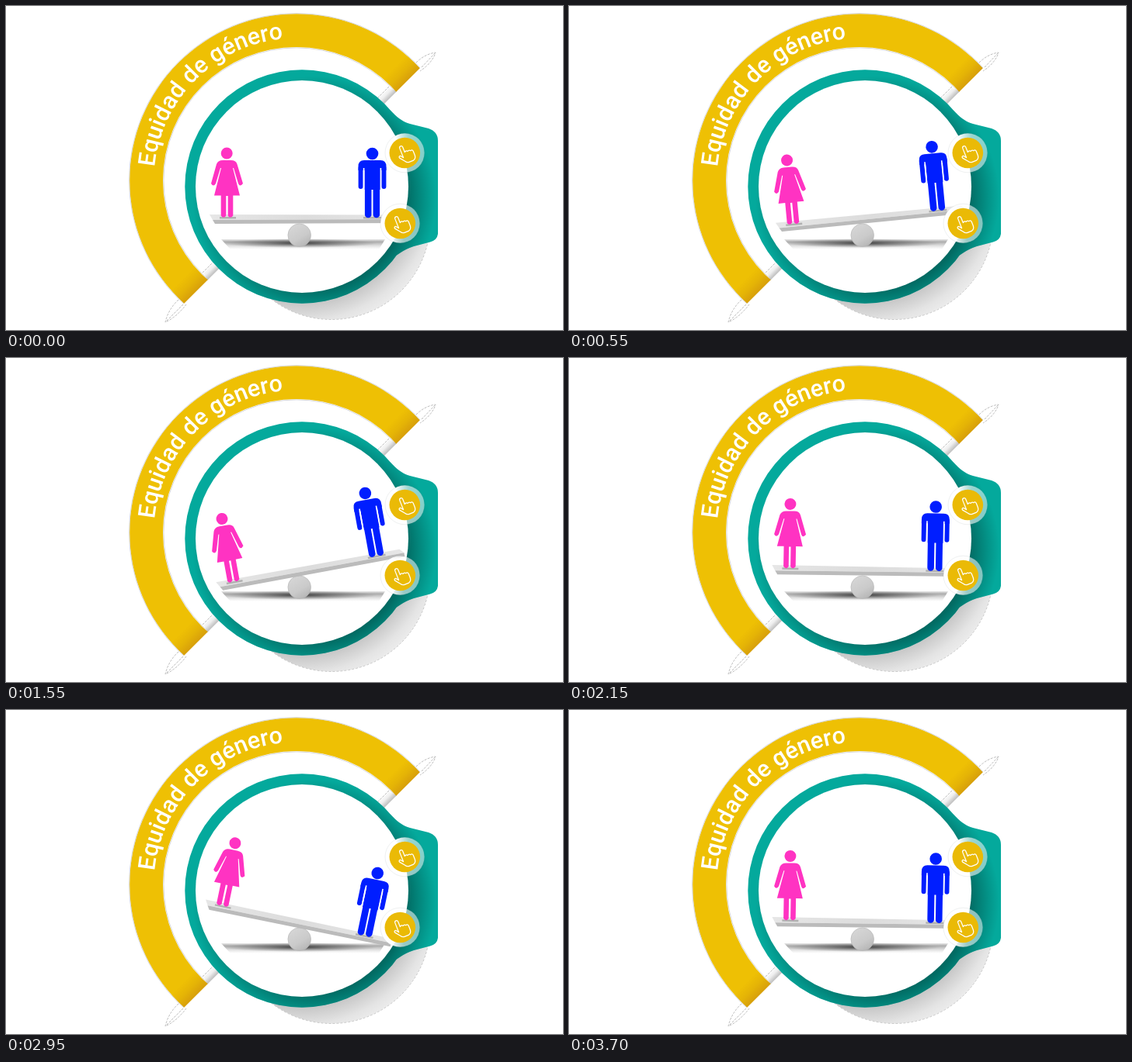
Recreate the animation shown at these times as an HTML page with a canvas. Size 717 by 418 pixels, loop 3.75 s.

```html
<!DOCTYPE html>
<html lang="es">
<head>
<meta charset="utf-8">
<title>Equidad de género</title>
<style>
  html, body { margin: 0; width: 100%; height: 100%; overflow: hidden; background: #fff; }
  canvas { display: block; }
</style>
</head>
<body>
<canvas id="stage" width="717" height="418"></canvas>
<script>
const ctx = document.getElementById('stage').getContext('2d');
const TAU = Math.PI * 2;
const LOOP = 3750, STEP = 50;
const YELLOW = '#eec004', TEAL = '#04a99c', PINK = '#ff33c2', BLUE = '#001eff';
const BAND = { x: 374, y: 225, inner: 172, outer: 214.8 };
const HUB = { x: 381, y: 233 };
const PIVOT = { x: 378, y: 233 };
// [time in ms, tilt in degrees]
const TILT = [[0, 0], [1375, -13.6], [2825, 13.6], [LOOP, 0.2]];

function tiltAt(t) {
  const i = TILT.findIndex(key => key[0] > t);
  const [t0, a] = TILT[i - 1], [t1, b] = TILT[i];
  return a + (b - a) * (t - t0) / (t1 - t0);
}

function fill(path, style) {
  ctx.fillStyle = style;
  ctx.fill(path);
}

function outline(path, style, width, dash = []) {
  ctx.setLineDash(dash);
  ctx.strokeStyle = style;
  ctx.lineWidth = width;
  ctx.stroke(path);
  ctx.setLineDash([]);
}

function circle(x, y, r) {
  const path = new Path2D();
  path.arc(x, y, r, 0, TAU);
  return path;
}

function ramp(gradient, ...stops) {
  stops.forEach(([at, color]) => gradient.addColorStop(at, color));
  return gradient;
}

const linear = (x0, y0, x1, y1, ...stops) =>
  ramp(ctx.createLinearGradient(x0, y0, x1, y1), ...stops);
const radial = (x, y, r0, r1, ...stops) =>
  ramp(ctx.createRadialGradient(x, y, r0, x, y, r1), ...stops);

function drawFlaps() {
  const strip = new Path2D('M503 110L482 131L466 131L492 105ZM259 354L280 333V317L254 343Z');
  fill(strip, linear(381, 232, 372, 223, [0, '#bdbdbd'], [0.5, '#eeeeee'], [1, '#ffffff']));
  const edges = new Path2D('M528 73Q539 62 553 60Q549 73 533 84M535 79L552 61' +
    'M222 379Q209 391 205 408Q220 401 232 385M228 385L206 407' +
    'M493 104L478 119M253 344L268 329');
  outline(edges, '#aaaaaa', 0.8, [3, 1.5]);
}

function drawBand() {
  ctx.save();
  ctx.clip(new Path2D('M0 0H613L195 418H0Z'));
  const ring = circle(BAND.x, BAND.y, BAND.outer);
  ring.arc(BAND.x, BAND.y, BAND.inner, TAU, 0, true);
  fill(ring, linear(381, 232, 364, 215, [0, '#d79f0b'], [0.5, '#e5b406'], [1, YELLOW]));
  outline(circle(BAND.x, BAND.y, BAND.outer + 0.7), '#bbbbbb', 0.6);
  outline(circle(BAND.x, BAND.y, BAND.inner - 0.9), '#bbbbbb', 0.6);
  ctx.restore();
}

function drawTitle() {
  const text = 'Equidad de género', radius = 183.5, start = 185.4 * Math.PI / 180;
  ctx.font = '500 30.5px Roboto, sans-serif';
  ctx.textAlign = 'center';
  ctx.fillStyle = '#fff';
  [...text].forEach((letter, i) => {
    const before = ctx.measureText(text.slice(0, i)).width;
    const angle = start + (before + ctx.measureText(letter).width / 2) / radius;
    ctx.save();
    ctx.translate(BAND.x, BAND.y);
    ctx.rotate(angle + Math.PI / 2);
    ctx.fillText(letter, 0, -radius);
    ctx.restore();
  });
}

function drawHub() {
  const { x, y } = HUB;
  const cast = circle(419, 277.5, 127);
  fill(cast, radial(x, y, 148, 212, [0, '#c4c4c4'], [0.4, '#e4e4e4'], [1, '#fdfdfd']));
  outline(cast, '#b5b5b5', 0.7, [3, 2]);

  fill(circle(x, y, 158), linear(x, y, x + 14, y + 14, [0, '#ffffff'], [1, 'rgba(255,255,255,0)']));
  drawFlaps();

  const body = circle(x, y, 150.7);
  body.addPath(new Path2D('M470 112C492 126 499 146 520 152L544 158Q556 162 556 174' +
    'V294Q555 302 546 304.5L525 310C498 319 488 338 462 359L420 233Z'));
  fill(body, TEAL);
  fill(body, radial(x + 16, y + 14, 118, 157,
    [0, 'rgba(0,60,56,.58)'], [0.5, 'rgba(0,68,63,.3)'], [1, 'rgba(0,75,70,0)']));
  fill(circle(x, y, 137), '#fff');
}

function drawFulcrum() {
  const ground = new Path2D('M277 301H488L480 314H289Z');
  fill(ground, linear(0, 301, 0, 314, [0, 'rgba(90,90,90,.15)'], [0.25, 'rgba(70,70,70,.45)'],
    [0.55, 'rgba(90,90,90,.25)'], [1, 'rgba(150,150,150,0)']));
  ctx.save();
  ctx.translate(378, 306);
  ctx.scale(1, 0.06);
  fill(circle(0, 0, 100), radial(0, 0, 0, 100,
    [0, 'rgba(20,20,20,.75)'], [0.4, 'rgba(40,40,40,.45)'], [1, 'rgba(60,60,60,0)']));
  ctx.restore();
  const ball = circle(377.7, 295.7, 14.8);
  fill(ball, linear(368, 283, 384, 311, [0, '#d6d6d6'], [0.6, '#cacaca'], [1, '#b4b4b4']));
  outline(ball, '#b4b4b4', 0.6);
}

function drawPlank() {
  fill(new Path2D('M262 269L502 269.5L507 275L266 276Z'),
    linear(262, 0, 507, 0, [0, '#e6e6e6'], [0.5, '#dcdcdc'], [1, '#e6e6e6']));
  fill(new Path2D('M266 276L507 275V280L269 281Z'), '#bbbbbb');
  fill(new Path2D('M275 272H296V274.5H275ZM460 272H483V274.5H460Z'), 'rgba(60,60,60,.3)');
}

function drawLimbs(path, color, width) {
  ctx.lineCap = 'round';
  outline(new Path2D(path), color, width);
  ctx.lineCap = 'butt';
}

function drawWoman() {
  fill(circle(284.2, 190, 7.5), PINK);
  fill(new Path2D('M279 199H289.5Q296 199 297.5 204L305 229Q301 234 299 229L293 209H292' +
    'L301 244.5H292.3V270.5Q288.5 275 285.7 270.5V245H283.3V270.5Q280 275 276.7 270.5V244.5H268' +
    'L277 209H276L270 229Q267 234 264 229L271 204Q273 199 279 199Z'), PINK);
}

function drawMan() {
  fill(circle(471.5, 190.5, 7.8), BLUE);
  fill(new Path2D('M461 199H482Q489.5 199 489.5 207V212H482V237H461.5V212H453.5V207Q453.5 199 461 199Z'), BLUE);
  drawLimbs('M456.6 209V233M486.4 209V233', BLUE, 6);
  drawLimbs('M466.2 236V269M476.8 236V269', BLUE, 8.6);
  outline(new Path2D('M460.6 209V237M482.4 209V237'), '#fff', 1.6);
}

function drawSeesaw(t) {
  drawFulcrum();
  ctx.save();
  ctx.translate(PIVOT.x, PIVOT.y);
  ctx.rotate(tiltAt(t) * Math.PI / 180);
  ctx.translate(-PIVOT.x, -PIVOT.y);
  drawPlank();
  drawWoman();
  drawMan();
  ctx.restore();
}

const hand = new Path2D('M-4.5 4V-9a2.1 2.1 0 0 1 4.2 0V-2q2.2-1.8 4 .4q2.2-1.4 3.6.6' +
  'q2.6-.8 3 1.6V6q0 5-4 6h-6q-3 0-4.6-3l-5-6.4q-.6-3 2.4-2Z');

function drawButton(x, y) {
  const halo = circle(x, y, 25.3);
  fill(halo, linear(x - 25, y, x + 25, y, [0, '#ffffff'], [0.3, 'rgba(255,255,255,.95)'],
    [0.6, 'rgba(255,255,255,.6)'], [1, 'rgba(255,255,255,.5)']));
  outline(halo, 'rgba(110,130,130,.15)', 0.8);
  fill(circle(x, y, 19.8), '#eaba06');
  ctx.save();
  ctx.translate(x + 1, y + 0.8);
  ctx.rotate(-0.38);
  ctx.lineJoin = 'round';
  outline(hand, '#fff', 1.25);
  ctx.restore();
}

function draw(t) {
  ctx.fillStyle = '#fff';
  ctx.fillRect(0, 0, 717, 418);
  drawHub();
  drawBand();
  drawTitle();
  drawSeesaw(t);
  drawButton(513.3, 189.5);
  drawButton(507.3, 280.5);
}

const began = performance.now();
function tick() {
  const t = (performance.now() - began) % LOOP;
  draw(Math.floor(t / STEP) * STEP);
  requestAnimationFrame(tick);
}
tick();
</script>
</body>
</html>
```
